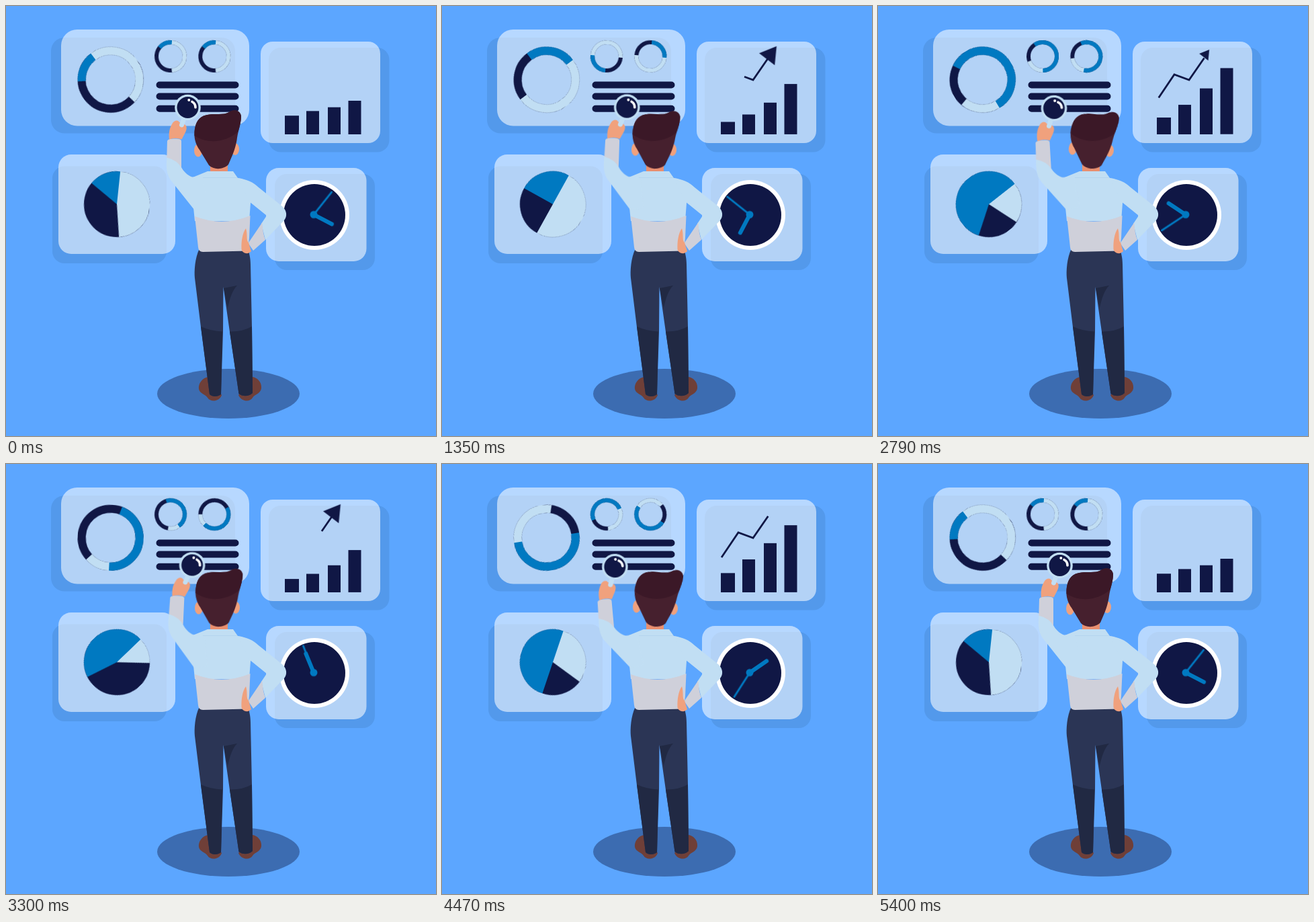
An HTML page that plays this animation: 640x640 px, repeating every 5430 ms.

```html
<!DOCTYPE html>
<html lang="en">
<head>
<meta charset="utf-8">
<title>Analyst at the dashboard</title>
<style>
  html, body { margin: 0; width: 100%; height: 100%; overflow: hidden; background: #5ca6ff; }
  svg { display: block; width: 100vw; height: 100vh; }

  :root {
    --ease: cubic-bezier(.3333, 0, .6667, 1);
    --navy: #101745; --blue: #0079c1; --pale: #c1def3; --grey: #cfd0da;
    --skin: #f0a17d; --hair: #46202e; --hair-dark: #3b1827;
    --trousers: #2b3555; --trousers-dark: #212943; --shoe: #6f3f38;
  }
  .navy { fill: var(--navy); } .pale { fill: var(--pale); } .grey { fill: var(--grey); }
  .skin { fill: var(--skin); } .shoe { fill: var(--shoe); }
  .legs { fill: var(--trousers); } .shade { fill: var(--trousers-dark); }
  .drop { fill: #5399eb; }
  .panel { fill: #fff; fill-opacity: .56; }

  .spin { animation: spin 5400ms linear infinite; }
  .spin.back { animation-direction: reverse; }
  .spin.fast { animation-duration: 1800ms; }
  .swing { animation: swing 2700ms var(--ease) infinite alternate; }
  @keyframes spin { to { transform: rotate(360deg); } }
  @keyframes swing { to { transform: rotate(46deg); } }

  .gauge circle { fill: none; }
  .rest { stroke: var(--navy); }
  .share-a { stroke: var(--pale); animation: share-a 5400ms var(--ease) infinite; }
  .share-b { stroke: var(--blue); animation: share-b 5400ms var(--ease) infinite; }
  @keyframes share-a {
    0%, 100% { stroke-dasharray: 170 360; }
    16.667% { stroke-dasharray: 216 360; }
    33.333% { stroke-dasharray: 144 360; }
    50% { stroke-dasharray: 72 360; }
    66.667% { stroke-dasharray: 36 360; }
    83.333% { stroke-dasharray: 108 360; }
  }
  @keyframes share-b {
    0%, 100% { stroke-dasharray: 56 360; }
    16.667% { stroke-dasharray: 108 360; }
    33.333% { stroke-dasharray: 72 360; }
    50% { stroke-dasharray: 216 360; }
    66.667% { stroke-dasharray: 144 360; }
    83.333% { stroke-dasharray: 180 360; }
  }

  .bars rect { transform-origin: 0 191px; animation: grow 900ms var(--ease) infinite alternate; }
  .bars rect:nth-child(1) { animation-delay: -450ms; }
  .bars rect:nth-child(2) { animation-delay: -300ms; }
  .bars rect:nth-child(3) { animation-delay: -150ms; }
  @keyframes grow { from { transform: scaleY(.5); } }

  .trend { fill: none; stroke: var(--navy); stroke-width: 2.8; stroke-dasharray: 100 120;
    animation: trace 1800ms var(--ease) infinite; }
  @keyframes trace {
    0% { stroke-dashoffset: 100.5; }
    50% { stroke-dashoffset: 0; }
    100% { stroke-dashoffset: -100.5; }
  }
  .tip { animation: pop 1800ms var(--ease) infinite; }
  @keyframes pop {
    0%, 50%, 100% { transform: scale(0); }
    59.2%, 90.8% { transform: scale(1); }
  }

  .head { transform-origin: 318px 252px; animation: nod 900ms var(--ease) infinite alternate; }
  @keyframes nod { to { transform: rotate(6deg); } }
  .arm { transform-origin: 286px 296px; animation: reach 900ms var(--ease) -1200ms infinite alternate; }
  @keyframes reach {
    from { transform: rotate(-7.4deg); }
    to { transform: rotate(2.6deg); }
  }
</style>
</head>
<body>
<svg viewBox="0 0 640 640">
  <rect width="640" height="640" fill="#5ca6ff"/>

  <g class="drop">
    <rect x="67" y="47" width="274" height="142.5" rx="20"/>
    <rect x="391" y="62" width="179.5" height="155.5" rx="18"/>
    <rect x="69" y="238.5" width="170" height="144.5" rx="18"/>
    <rect x="400" y="250" width="149" height="143" rx="18"/>
  </g>
  <g class="panel">
    <rect x="82" y="35" width="280" height="143.5" rx="24"/>
    <rect x="379" y="53" width="178" height="151" rx="18"/>
    <rect x="78" y="221" width="174" height="148" rx="19"/>
    <rect x="387" y="241" width="149.5" height="139" rx="19"/>
  </g>

  <g id="gauges"></g>

  <path d="M228.5 117.5H341.500M228.500 134.500H341.500M228.500 152.700H341.500"
    stroke="#101745" stroke-width="10" stroke-linecap="round"/>

  <g class="bars navy">
    <rect x="415" y="154" width="21" height="37"/>
    <rect x="447" y="136" width="19" height="55"/>
    <rect x="479" y="116" width="19" height="75"/>
    <rect x="509.5" y="91" width="19" height="100"/>
  </g>
  <path class="trend" pathLength="100" d="M416 139L441 102L463 110L485.500 77.500"/>
  <g transform="translate(486.4 71.8)">
    <path class="tip navy" d="M11.600 -12L-14.400 -1.500L8.800 16.300Z"/>
  </g>

  <circle cx="459" cy="311" r="52" fill="#fff"/>
  <circle class="navy" cx="459" cy="311" r="46"/>
  <g transform="translate(458 310.5)" stroke="#0079c1" stroke-linecap="round">
    <g transform="rotate(117.5)"><path class="spin" d="M0 0V-30.500" stroke-width="6"/></g>
    <g transform="rotate(38.4)"><path class="spin fast" d="M0 0V-42.500" stroke-width="2.8"/></g>
    <circle r="5.5" fill="#0079c1" stroke="none"/>
  </g>

  <ellipse cx="331" cy="577" rx="106" ry="37" fill="#3c6cb1"/>

  <g class="shoe">
    <path d="M302 552C292 553 286 562 287 570C288 577 297 578 300 583C304 590 318 589 321 579Z"/>
    <path d="M365 552C374 552 381 560 380 569C379 577 370 578 367 583C363 590 350 589 346 579Z"/>
  </g>
  <path class="legs" d="M288 361C281 375 280 395 281 405L290 478L303 578C307 582 315 582 320 578L323 485
    L323.500 418L333 485L346.500 577C351 581 361 582 367 576L366 478L364 385C364 375 362 368 360 361Z"/>
  <g class="shade">
    <path d="M290 477Q305 484 322 484.500L320 578C315 582 307 582 303 578Z"/>
    <path d="M333 484.500Q352 485 366 477L367 576C361 582 351 581 346.500 577Z"/>
    <path d="M324 420L344 416C337 423 333 435 330 449Z"/>
  </g>

  <rect x="304" y="236" width="26" height="11" fill="#e98f6f"/>

  <path class="pale" d="M278 255L300 246H338L345 256Q362 259 370 268L364 293L362 320L281 320L279 300L270 280Z"/>
  <path class="grey" d="M281 313Q322 329 363.500 312L362 345L360 364.500L293 366Q286.500 366 286 359Z"/>

  <path class="pale" d="M345 256C358 258 368 262 376 270L411 298C418 304 419 313 414 319L386 348L380 324L388 312L362 291Z"/>
  <path class="grey" d="M381.500 322Q382 338 386 348L368 364L360.500 353Z"/>
  <path class="skin" d="M357 331C352 338 350 350 350.500 362C352 369 361 370 365 365L361 352C357 349 360 340 357 331Z"/>

  <g class="arm">
    <path class="pale" d="M294 254.500H277C270 252 264 246 261 240C259 233 250 227 239.500 225
      C238 240 239 250 245 259L280 303L300 300Z"/>
    <path class="grey" d="M240 201Q241 197 251 197.500Q261 197 261 201V241Q256 230 239.300 225.500Z"/>
    <path class="skin" d="M243 198.500C242 190 243 182 247.500 175C250 170 256 169 258 173L265 176
      C269 177 270 182 267 188L261.500 198.500Q252 195 243 198.500Z"/>
    <path d="M261.500 177L266 165" stroke="#c1def3" stroke-width="7" stroke-linecap="round"/>
    <circle class="pale" cx="270.500" cy="151" r="19.300"/>
    <circle class="navy" cx="270.500" cy="151" r="16"/>
    <circle cx="272.300" cy="140" r="2" fill="#fff"/>
    <path d="M277 142.500Q282 145 282 151" fill="none" stroke="#fff" stroke-width="3.600" stroke-linecap="round"/>
  </g>
  <path d="M293 255.500H344" stroke="#b3d3ec" stroke-width=".8"/>

  <g class="head">
    <ellipse class="skin" cx="286" cy="215" rx="6" ry="9.500"/>
    <ellipse class="skin" cx="341" cy="213" rx="6" ry="9"/>
    <path fill="#46202e" d="M280.500 194C280 181 283 168 294 163.500C308 158 322 164 332 158C339 153 349 155 350 164
      C350 174 346 184 344 196C343 205 340 215 337 222L331 236C323 244 309 244 302 237L288 214C283 207 281 200 280.500 194Z"/>
    <path fill="#3b1827" d="M280.500 193C280 181 283 168 294 163.500C308 158 322 164 332 158C339 153 349 155 350 164
      C350 172 348 179 345.500 187C328 203 300 206 280.500 193Z"/>
  </g>
</svg>
<script>
  const CYCLE = 5400, HOLD = 30;

  // Two shares grow clockwise and anticlockwise from one rotating seam.
  function gauge(x, y, r, width, seam, motion) {
    const circle = (name, extra = "") =>
      `<circle class="${name}" r="${r}" stroke-width="${width}" ${extra}/>`;
    return `<g class="gauge" transform="translate(${x} ${y}) rotate(${seam - 90})"><g class="${motion}">
      ${circle("rest")}
      ${circle("share-a", 'pathLength="360"')}
      ${circle("share-b", 'pathLength="360" transform="scale(1 -1)"')}
    </g></g>`;
  }

  document.getElementById("gauges").innerHTML =
    gauge(155.7, 109.7, 43, 12, 323, "spin") +
    gauge(245, 75, 21, 6, 5, "spin back") +
    gauge(310.3, 75, 21, 6, 5, "spin") +
    gauge(165, 295, 24.5, 49, 6, "swing");

  // One clock drives every keyframe, adding a short rest after each cycle.
  const motions = document.getAnimations();
  motions.forEach(m => m.pause());
  const start = performance.now();

  function tick() {
    const t = Math.min((performance.now() - start) % (CYCLE + HOLD), CYCLE);
    motions.forEach(m => { m.currentTime = t; });
    requestAnimationFrame(tick);
  }
  tick();
</script>
</body>
</html>
```
